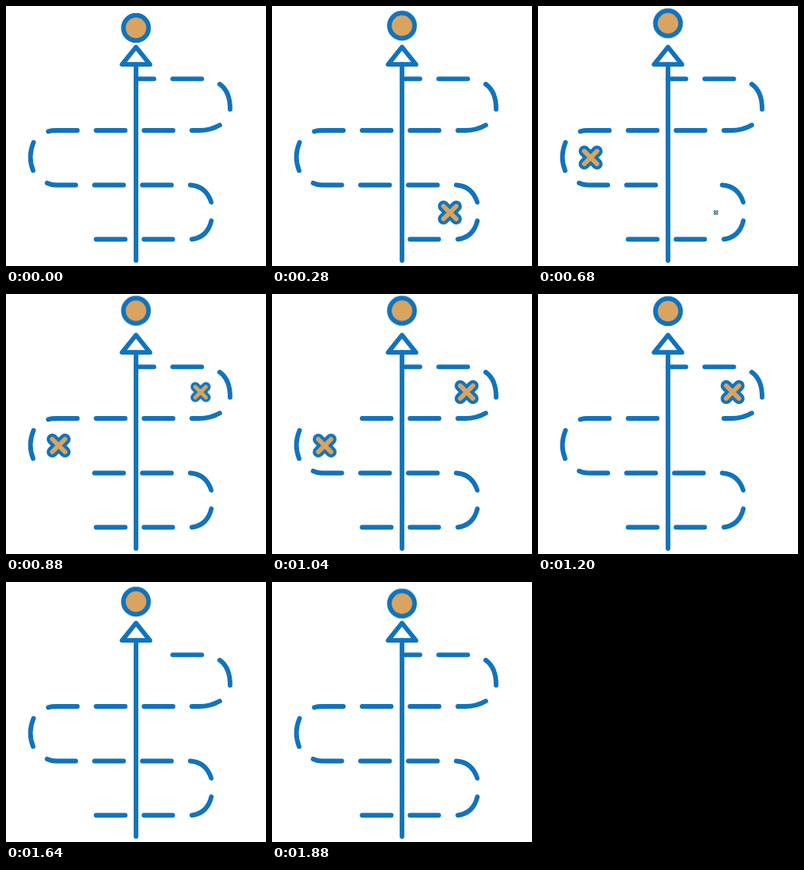
Write an HTML page that moves like this. It is 326 px wide and 326 px high and loops after 1.92 s.

```html
<!DOCTYPE html>
<html lang="en">
<head>
<meta charset="utf-8">
<title>Winding route</title>
<style>
  html, body { margin: 0; width: 100%; height: 100%; overflow: hidden; background: #fff; }
  svg { display: block; width: 100vw; height: 100vh; }

  .line { fill: none; stroke: #1173bc; stroke-width: 5.8; stroke-linecap: round; stroke-linejoin: round; }
  .ball { fill: #d9a45f; animation: bob 1920ms infinite; }
  .edge { stroke: #1173bc; stroke-width: 14; stroke-linecap: round; }
  .core { stroke: #d9a45f; stroke-width: 5.8; stroke-linecap: round; }

  /* Every second dash blinks out in turn, from the bottom up. */
  .blink { animation: blink 1920ms step-end calc(var(--i) * 200ms - 1740ms) infinite; }
  .low { animation: low 1920ms infinite; }
  .left { animation: left 1920ms infinite; }
  .high { animation: high 1920ms infinite; }

  @keyframes bob {
    0% { transform: none; animation-timing-function: ease-out; }
    50% { transform: translateY(-6.6px); animation-timing-function: ease-in; }
    100% { transform: none; }
  }
  @keyframes blink {
    0% { opacity: 0; }
    10.4167%, 100% { opacity: 1; }
  }
  @keyframes low {
    0%, 6.25% { transform: scale(0); animation-timing-function: ease-out; }
    14.6%, 28.75% { transform: scale(1); animation-timing-function: linear; }
    37.1%, 100% { transform: scale(0); }
  }
  @keyframes left {
    0%, 26.6% { transform: scale(0); animation-timing-function: ease-out; }
    34.9%, 54.2% { transform: scale(1); animation-timing-function: linear; }
    62.5%, 100% { transform: scale(0); }
  }
  @keyframes high {
    0%, 40.4% { transform: scale(0); animation-timing-function: ease-out; }
    48.7%, 65.6% { transform: scale(1); animation-timing-function: linear; }
    74%, 100% { transform: scale(0); }
  }
</style>
</head>
<body>
<svg viewBox="0 0 326 326">
  <defs>
    <g id="cross">
      <path class="edge" d="M-8-8 8 8M8-8-8 8"/>
      <path class="core" d="M-8-8 8 8M8-8-8 8"/>
    </g>
  </defs>

  <g class="line">
    <path d="M173 292.5H209M231 224.5Q251 226 257.3 246M111 224.5H147.5M34 206.3Q27 189 34.5 171M113 156H149.5M209 91.3H245.5"/>
    <path class="blink" style="--i:0" d="M113 292.5H149.5"/>
    <path class="blink" style="--i:1" d="M233 292.5Q252.5 290 257.5 269.3"/>
    <path class="blink" style="--i:2" d="M171 224.5H207.5"/>
    <path class="blink" style="--i:3" d="M87.5 224.5H63Q57 224.5 51.5 222"/>
    <path class="blink" style="--i:4" d="M53 157.3Q57 156 63 156H89.5"/>
    <path class="blink" style="--i:5" d="M173 156H209.5"/>
    <path class="blink" style="--i:6" d="M281 129.5Q281 107 268 98"/>
    <path class="blink" style="--i:7" d="M163 91.3H185.5"/>
    <path d="M233 156H242Q257 156 268 149.3"/>
    <path d="M163 73V319M163 51.5 145.5 73.2H180.5Z"/>
    <circle class="ball" cx="163" cy="27.5" r="15.8"/>
  </g>

  <g transform="translate(223 259)"><use class="low" href="#cross"/></g>
  <g transform="translate(66 190)"><use class="left" href="#cross"/></g>
  <g transform="translate(244 123)"><use class="high" href="#cross"/></g>
</svg>
</body>
</html>
```
